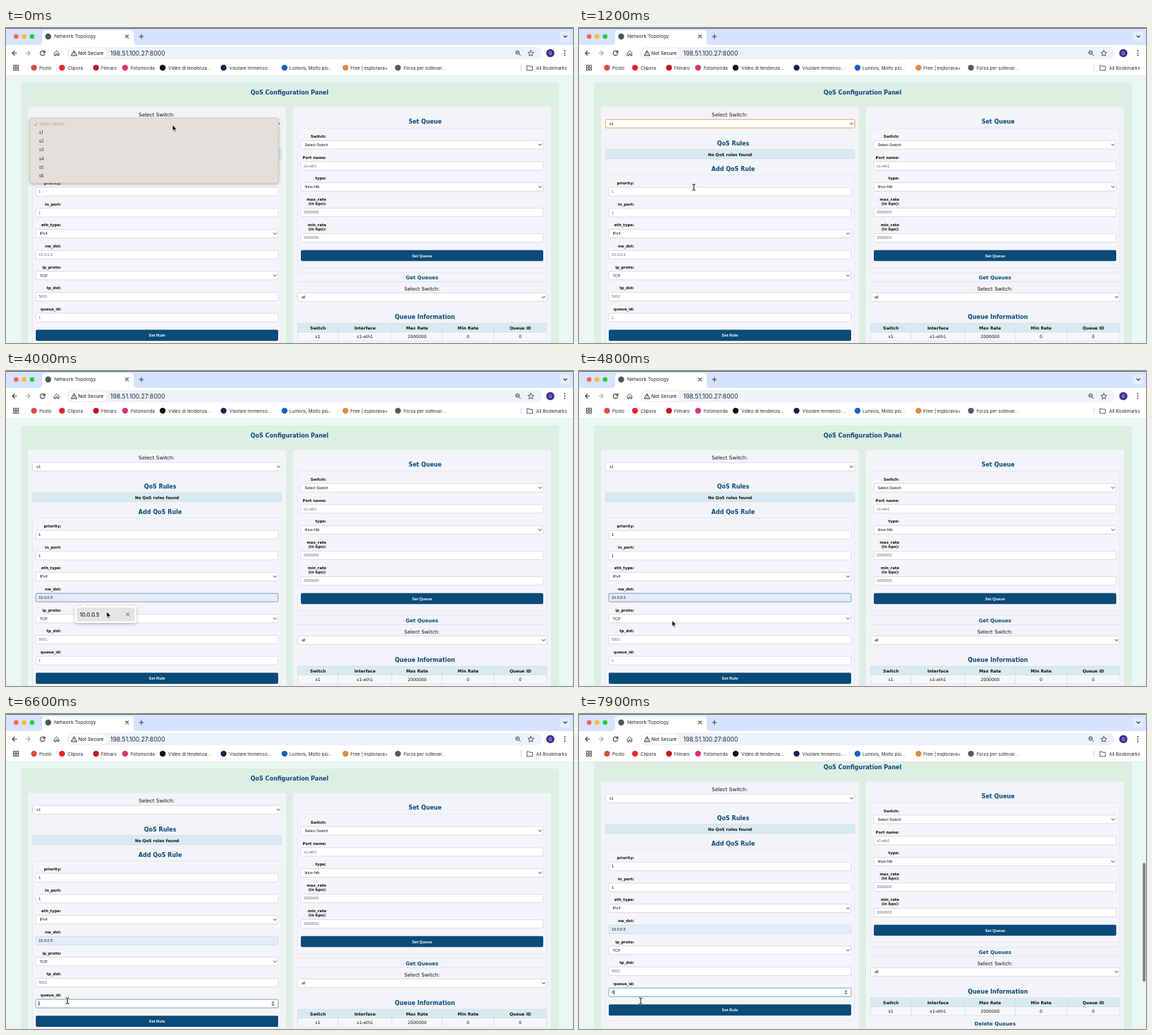
Animation, 800 px wide and 445 px high, one loop 8 s. Source, as an HTML page:

```html
<!DOCTYPE html>
<html lang="en">
<head>
<meta charset="utf-8">
<title>Network Topology</title>
<style>
  html, body { margin: 0; width: 100%; height: 100%; overflow: hidden; background: #fff; }
  svg { display: block; width: 100%; height: 100%; }
  .ui { font-family: Inter, Roboto, sans-serif; }
  .page { font-family: "DejaVu Sans", sans-serif; }
  .field { font-family: "Liberation Sans", Arial, sans-serif; }
  .b { font-weight: bold; }
  .m { font-weight: 500; }
</style>
</head>
<body>
<svg id="stage" viewBox="0 0 800 445" preserveAspectRatio="none">
  <defs>
    <clipPath id="view"><rect x="0" y="67" width="800" height="378"/></clipPath>
    <filter id="shade" x="-10%" y="-20%" width="120%" height="150%">
      <feDropShadow dx="0" dy="1.5" stdDeviation="2" flood-color="#000" flood-opacity=".28"/>
    </filter>
  </defs>
  <g clip-path="url(#view)">
    <rect y="67" width="800" height="378" fill="#eaf7f4"/>
    <g id="page"><g id="layout"></g><g id="form"></g></g>
    <g id="bar"></g>
  </g>
  <g id="chrome"></g>
  <g id="overlay"></g>
</svg>
<script>
const LOOP = 8000, STEP = 100;
const BLUE = '#0d4878', INK = '#101010', HINT = '#65656a', ICON = '#3f4348';
const $ = id => document.getElementById(id);

const rect = (x, y, w, h, fill, extra = '') =>
  `<rect x="${x}" y="${y}" width="${w}" height="${h}" fill="${fill}" ${extra}/>`;
const circle = (x, y, r, fill, extra = '') =>
  `<circle cx="${x}" cy="${y}" r="${r}" fill="${fill}" ${extra}/>`;
const line = (d, color, w = 1, extra = '') =>
  `<path d="${d}" fill="none" stroke="${color}" stroke-width="${w}" stroke-linecap="round" stroke-linejoin="round" ${extra}/>`;
// y is the middle of the capitals
const text = (s, x, y, size, cls, color = INK, anchor = 'start') =>
  `<text x="${x}" y="${y + size * 0.36}" font-size="${size}" class="${cls}" fill="${color}" text-anchor="${anchor}">${s}</text>`;

const head = (s, x, y, size = 8) => text(s, x, y, size, 'page b', BLUE, 'middle');
const plain = (s, x, y, size = 7.2) => text(s, x, y, size, 'page', INK, 'middle');
const bold = (s, x, y, size = 5.9) => text(s, x, y, size, 'page b', INK, 'middle');
const label = (s, x, y) => text(s, x, y, 5.35, 'page b', INK, 'end');
const chevron = (x, y) => line(`M${x - 2} ${y - 1}l2 2l2-2`, '#222', 0.95);
const box = (x, y, w, fill = '#fff', stroke = '#cfd0d6', sw = 0.7) =>
  rect(x, y - 6, w, 12, fill, `rx="1.3" stroke="${stroke}" stroke-width="${sw}"`);
const input = (x, y, w, s, color = HINT) => box(x, y, w) + text(s, x + 4, y, 5.5, 'field', color);
const select = (x, y, w, s) =>
  box(x, y, w) + text(s, x + 5.5, y, 5.5, 'field', INK) + chevron(x + w - 4.5, y);
const button = (s, x, y, w, h) =>
  rect(x, y, w, h, '#0b4b78', 'rx="2"') + text(s, x + w / 2, y + h / 2, 5.7, 'field b', '#fff', 'middle');
const cell = (x, y, w, h, fill) => rect(x, y, w, h, fill, 'stroke="#d3dee3" stroke-width=".7"');
const group = (x, y, w, h) =>
  rect(x, y, w, h, '#f4f5f9', 'rx="2" stroke="#e4e5eb" stroke-width=".8"');

function layout() {
  const edges = [411.5, 468.5, 544.5, 615.5, 688.5, 763];
  const heads = ['Switch', 'Interface', 'Max Rate', 'Min Rate', 'Queue ID'];
  const row = ['s1', 's1-eth1', '2000000', '0', '0'];
  const table = heads.map((s, i) => {
    const x = edges[i], w = edges[i + 1] - x, mid = x + w / 2;
    return cell(x, 417, w, 12.5, '#d8eaef') + bold(s, mid, 423.5) +
      cell(x, 429.5, w, 12.5, '#f6f7fa') + plain(row[i], mid, 436.3, 6);
  }).join('');
  return rect(21, 77, 759, 420, '#deeee4', 'rx="4"') +
    head('QoS Configuration Panel', 400, 91) +
    rect(31, 111.5, 364, 380, '#f3f4f8', 'rx="3"') +
    rect(405, 111.5, 364, 380, '#f3f4f8', 'rx="3"') +
    plain('Select Switch:', 212.7, 122.8) +
    head('QoS Rules', 217.5, 162.7) +
    cell(37.5, 171.7, 351.5, 13, '#d8eaef') + bold('No QoS rules found', 213, 178.5, 5.7) +
    head('Add QoS Rule', 217.5, 198.8) +
    group(37.5, 207.5, 351, 241) +
    button('Set Rule', 42, 426.3, 342, 15.7) +
    head('Set Queue', 591.3, 132.4) +
    group(411.5, 141.5, 351.5, 197) +
    label('Switch:', 452, 153) + select(416, 165, 342, 'Select Switch') +
    label('Port name:', 452, 183) + input(416, 194.8, 342, 's1-eth1') +
    label('type:', 452, 212) + select(416, 224.5, 342, 'linux-htb') +
    label('max_rate', 452, 242) + label('(in bps):', 452, 248.5) + input(416, 260.5, 342, '2000000') +
    label('min_rate', 452, 278) + label('(in bps):', 452, 284.5) + input(416, 296.5, 342, '2000000') +
    button('Set Queue', 416, 313.8, 342, 15.5) +
    line('M411.5 345H763M411.5 358.5H763', '#e1e3ea', 0.8) +
    head('Get Queues', 587, 352.2, 7.05) +
    plain('Select Switch:', 587, 368, 7.1) +
    select(411.5, 380.3, 351.5, 'all') +
    head('Queue Information', 591, 407.9) + table +
    head('Delete Queues', 587, 453, 7.05);
}

function chrome() {
  const marks = [
    [39.5, '#dc4a3d', 'Posto', 47], [79, '#f0202c', 'Clipora', 87],
    [127, '#c9141f', 'Filmaro', 134], [168, '#d8327c', 'Fotomonda', 176],
    [221, '#111', 'Video di tendenza...', 229], [307, '#17224d', 'Visolare Immenso:...', 315],
    [393, '#1560c4', 'Lumivis, Molto più...', 400], [479, '#e08a3c', 'Free | esplorava+', 486],
    [553, '#555a5f', 'Forza per sollevar...', 561]
  ];
  const y = 35.5;
  let s = rect(0, 0, 800, 25, '#d5e3fc') + rect(0, 24, 800, 43.3, '#fff') +
    rect(0, 0, 800, 0.9, '#4a4d52') +
    line('M0 67.3H800', '#e1e5ea', 0.7) +
    '<path d="M46 24q5 0 5-5V8q0-5 5-5H175q5 0 5 5v11q0 5 5 5z" fill="#fff"/>' +
    circle(14.3, 12, 3.3, '#fe5f57') + circle(25.5, 12, 3.3, '#febc2e') + circle(36.8, 12, 3.3, '#28c840') +
    circle(59.5, 12, 4.2, '#46565a') +
    text('Network Topology', 68, 12, 6.75, 'ui', '#25282c') +
    line('M168.6 10l4 4m0-4l-4 4', ICON, 1.1) + line('M188 12h6m-3-3v6', ICON, 1.1) +
    rect(782, 5, 14, 14, '#e4edfd', 'rx="4"') + line('M787 11l2.2 2.2l2.2-2.2', '#24282e', 1.1);
  s += line(`M15 ${y}H9m3-3l-3 3l3 3`, ICON, 1.1) +
    line(`M28 ${y}h6m-3-3l3 3l-3 3`, '#a6a9ad', 1.1) +
    line('M54.6 34.3a3.3 3.3 0 1 0 .1 2.3M54.9 32v2.6h-2.6', ICON, 1.1) +
    line('M68.5 35l3-2.8l3 2.8v4h-2v-2.4h-2v2.4h-2z', ICON, 1) +
    rect(86, 26.7, 670, 17.6, '#edf1fa', 'rx="8.8"') +
    rect(88.5, 28.7, 54, 13.6, '#fff', 'rx="6.8"') +
    '<path d="M96 32l4 7h-8z" fill="none" stroke="#25282c" stroke-width="1" stroke-linejoin="round"/>' +
    line('M96 34.5v1.6m0 1.4v.1', '#25282c', 0.8) +
    text('Not Secure', 102, y, 6.7, 'ui m', '#25282c') +
    text('198.51.100.27:8000', 147.3, y, 8.6, 'ui', '#25282c') +
    circle(721.8, 34.7, 2.5, 'none', `stroke="${ICON}"`) + line('M723.8 36.7l2.2 2.2M720.7 34.7h2.2', ICON, 1) +
    line('M740.5 31.5l1.2 2.7l2.9.3l-2.2 2l.6 2.9l-2.5-1.5l-2.5 1.5l.6-2.9l-2.2-2l2.9-.3z', ICON, 0.9) +
    circle(768, y, 5.8, '#3c3191') + text('G', 768, y, 5.6, 'ui', '#fff', 'middle') +
    [32.2, 35.5, 38.8].map(v => circle(788.5, v, 0.95, ICON)).join('');
  for (let i = 0; i < 4; i++)
    s += rect(10.5 + i % 2 * 4.3, 52.6 + (i >> 1) * 4.3, 2.8, 2.8, 'none', `stroke="${ICON}" stroke-width=".9"`);
  for (const [x, color, name, tx] of marks)
    s += circle(x, 56.1, 4.2, color) + text(name, tx, 56.2, 6.4, 'ui', '#25282c');
  return s + line('M726.5 51.5v9', '#c9d6ee', 0.9) +
    line('M735 59.5v-6.5h2.8l1 1.2h4v5.3z', ICON, 0.9) +
    text('All Bookmarks', 748, 56.2, 6.45, 'ui', '#25282c');
}

// fields of the rule form: id, hint, typed value and when it arrives
const rows = [
  { id: 'priority', hint: '1', value: '1', at: 1900 },
  { id: 'in_port', hint: '1', value: '1', at: 2600 },
  { id: 'eth_type', pick: 'IPv4' },
  { id: 'nw_dst', hint: '10.0.0.2', value: '10.0.0.5', at: 3700, auto: true },
  { id: 'ip_proto', pick: 'TCP' },
  { id: 'tp_dst', hint: '5001' },
  { id: 'queue_id', hint: '1', value: '0', at: 7000 }
];
// id, start, end, start of caret blinking
const focus = [
  ['switch', 700, 1500, 0], ['priority', 1500, 2300, 1900], ['in_port', 2300, 3200, 2600],
  ['nw_dst', 3200, 6400, 4300], ['queue_id', 6400, LOOP, 7450]
];
const hover = [['priority', 1400, 1900], ['tp_dst', 5300, 6300], ['queue_id', 6400, LOOP]];
const within = (list, t) => list.find(([, a, b]) => t >= a && t < b) || [];

const MENU_END = 600, POP_START = 3300, POP_HOVER = 3700, POP_END = 4300, SCROLL = 7400;

// time, x, y, look until the next key
const track = [
  [0, 235, 137, 'arrow'], [100, 235, 137, 'arrow'], [400, 214, 146, 'arrow'], [700, 208, 147, 'arrow'],
  [1000, 168, 216, 'beam'], [1200, 162, 225, 'beam'], [1500, 128, 231, 'beam'], [1900, 128, 231, 'none'],
  [2800, 128, 233, 'beam'], [3200, 130, 320, 'beam'], [3400, 131, 322, 'arrow'], [3800, 142, 340, 'arrow'],
  [4400, 142, 340, 'arrow'], [4700, 134, 350, 'arrow'], [5200, 108, 374, 'beam'], [5500, 99, 378, 'beam'],
  [6000, 99, 378, 'beam'], [6400, 86.5, 405.3, 'beam'], [LOOP, 87, 405.3, 'beam']
];

function pointer(t) {
  const i = track.findIndex((k, n) => n + 1 === track.length || t < track[n + 1][0]);
  const [t0, x0, y0, look] = track[i], [t1, x1, y1] = track[i + 1];
  const u = (t - t0) / (t1 - t0), e = u * u * (3 - 2 * u);
  const at = `transform="translate(${x0 + (x1 - x0) * e} ${y0 + (y1 - y0) * e})"`;
  if (look === 'arrow')
    return `<path ${at} d="M0 0V8.4L2 6.6L3.3 9.7L4.7 9.1L3.4 6.1H6z" fill="#000" stroke="#fff" stroke-width=".7"/>`;
  if (look === 'beam') {
    const d = 'M-2-4.3q2 0 2 1.2V3.1q0 1.2-2 1.2M2-4.3q-2 0-2 1.2M0 3.1q0 1.2 2 1.2';
    return line(d, '#fff', 1.8, at) + line(d, '#000', 0.9, at);
  }
  return '';
}

const spinner = (x, y) =>
  rect(x - 2.5, y - 4, 5, 8, '#ececef', 'rx="1"') +
  `<path d="M${x - 1.5} ${y - 0.9}h3l-1.5-2zM${x - 1.5} ${y + 0.9}h3l-1.5 2z" fill="#333"/>`;

function form(t) {
  const [active, , , blink] = within(focus, t);
  const [over] = within(hover, t);
  let s = select(37.5, 135.2, 351.5, t < MENU_END ? 'Select Switch' : 's1');
  if (active === 'switch') s += box(37.5, 135.2, 351.5, 'none', '#e8b458', 1);
  rows.forEach((f, i) => {
    const y = 231.2 + i * 29.65;
    s += label(f.id + ':', 78, y - 12);
    if (f.pick) { s += select(42, y, 342, f.pick); return; }
    const full = f.at !== undefined && t >= f.at, on = active === f.id;
    s += box(42, y, 342, full && f.auto ? '#e4ecfa' : '#fff', on ? '#7a97bd' : undefined, on ? 0.95 : undefined);
    s += text(full ? f.value : f.hint, 46, y, 5.5, 'field', full ? INK : HINT);
    const lit = t < blink || (t - blink) % 1000 < 500;
    const preview = f.auto && t >= POP_HOVER && t < POP_END;
    if (on && lit && !preview) {
      const x = 46.2 + (full ? (f.value.length > 1 ? 20.1 : 3.3) : 0);
      s += line(`M${x} ${y - 3}v6`, '#000', 0.7);
    }
    if (over === f.id) s += spinner(376.7, y);
  });
  return s;
}

function menu(t) {
  const top = 135.8, gap = 12.2;
  let s = rect(33.5, 127.3, 351, 91.7, '#e3dfdc', 'rx="3.5" stroke="#bdb9b6" stroke-width=".6" filter="url(#shade)"') +
    line(`M40 ${top + 0.5}l1.4 1.8l2.5-4.2`, '#a29e9b', 1) +
    text('Select Switch', 46.8, top, 5.5, 'ui', '#aaa6a3');
  if (t >= 300) s += rect(36.5, top + gap - 6, 345, 12, '#3b7ff0', 'rx="2.5"');
  for (let i = 1; i < 7; i++)
    s += text('s' + i, 46.8, top + gap * i, 5.6, 'ui', i === 1 && t >= 300 ? '#fff' : '#222');
  return s;
}

function popup(t) {
  return '<g filter="url(#shade)">' + rect(97.3, 332, 86.7, 24, '#fff', 'rx="3.5"') +
    '<path d="M105 332.2l4-3.2l4 3.2z" fill="#fff"/></g>' +
    (t >= POP_HOVER ? rect(99.6, 334.2, 82.2, 19.6, '#e5e5e6', 'rx="2.5"') : '') +
    text('10.0.0.5', 104, 344, 7.5, 'ui m', '#1c1e21') +
    line('M169.5 341.5l4.6 4.6m0-4.6l-4.6 4.6', '#4a4d52', 0.9);
}

function draw(t) {
  const u = Math.max(0, (t - SCROLL) / 500);
  const shift = 16 * Math.pow(Math.min(u, 1), 1.5);
  $('page').setAttribute('transform', `translate(0 ${-shift})`);
  $('form').innerHTML = form(t);
  $('bar').innerHTML = t > SCROLL ? rect(795.4, 203 + shift * 0.446, 3.8, 168, '#7b8083', 'rx="1.9"') : '';
  $('overlay').innerHTML =
    (t < MENU_END ? menu(t) : '') +
    (t >= POP_START && t < POP_END ? popup(t) : '') + pointer(t);
}

$('layout').innerHTML = layout();
$('chrome').innerHTML = chrome();

let last = -1;
function tick() {
  const t = Math.floor(performance.now() % LOOP / STEP) * STEP;
  if (t !== last) draw(last = t);
  requestAnimationFrame(tick);
}
tick();
</script>
</body>
</html>
```
